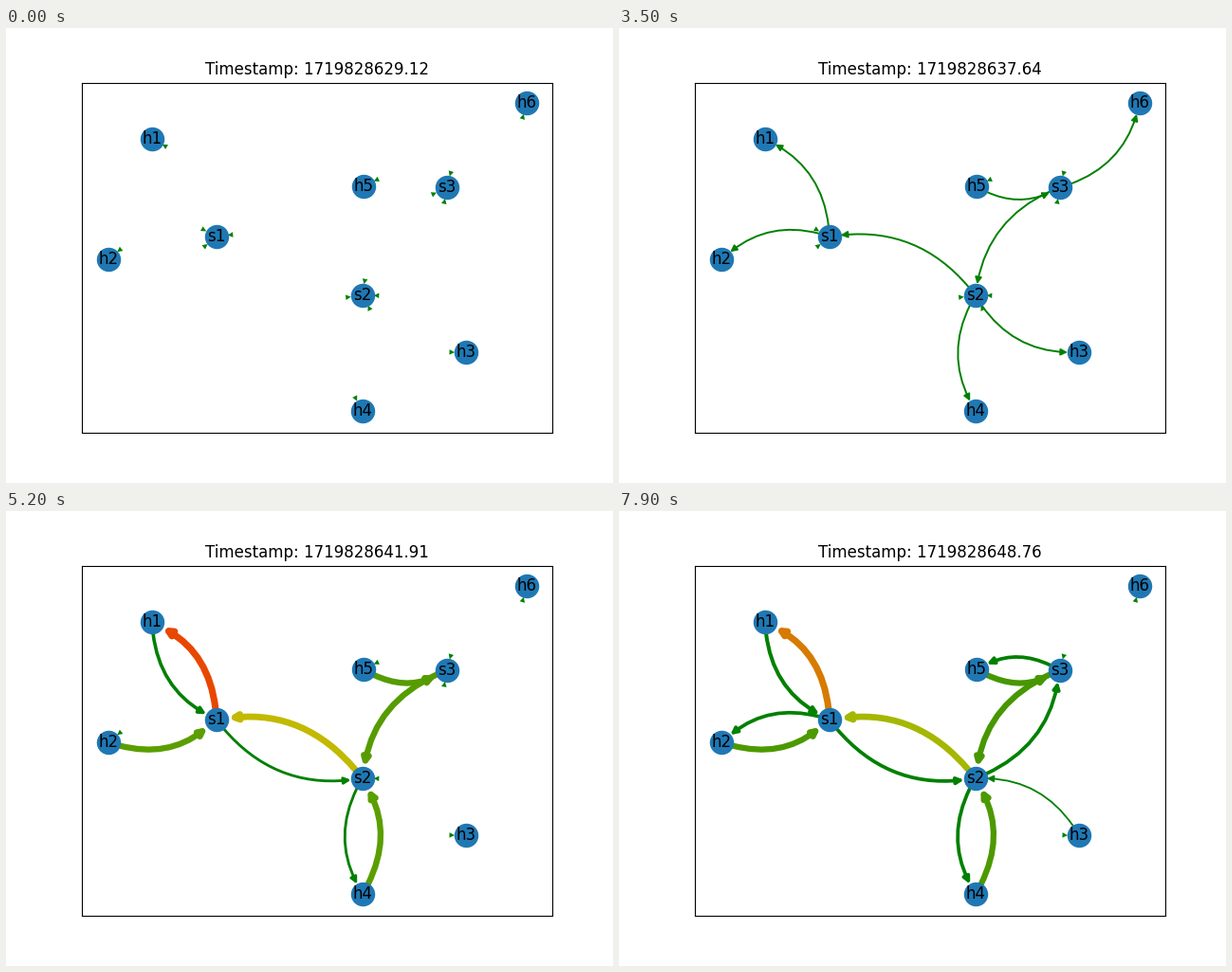
Recreate the animation shown at these times as a matplotlib script. Size 640x480 px, loop 8 s.

```python
import numpy as np
import matplotlib.pyplot as plt
from matplotlib.animation import FuncAnimation
from matplotlib.colors import LinearSegmentedColormap
from matplotlib.patches import FancyArrowPatch

plt.rcParams["font.family"] = "DejaVu Sans"

FRAMES, INTERVAL = 80, 100
NODE_SIZE = 300
FULL_RATE = 1.6e5
POLL = 4                    # steps between two traffic readings
START, QUIET = 38, 50       # hosts begin sending; replies pause once

# Node centres in stage pixels, y down.
NODES = {
    "h1": (154.1, 117.1), "h2": (108.1, 244.1), "h3": (485.1, 342.1),
    "h4": (376.0, 404.1), "h5": (377.0, 167.1), "h6": (549.0, 79.1),
    "s1": (221.8, 220.1), "s2": (375.7, 282.1), "s3": (464.7, 168.1),
}
LINKS = ["h1 s1", "h2 s1", "s1 s2", "s2 h3", "s2 h4", "s2 s3", "s3 h5", "s3 h6"]
EDGES = [e for a, b in map(str.split, LINKS) for e in ((a, b), (b, a))]

FLOOD = "h5s3 s3h6 s3s2 s2h3 s2h4 s2s1 s1h1 s1h2"
CLOCK_BASE = 1719828600
CLOCK = {0: 29.12, 20: 34.13, 35: 37.64, 42: 39.39, 52: 41.91, 68: 45.97, 79: 48.76}

heat = LinearSegmentedColormap.from_list("heat", ["g", "y", "r"])


def rates_at(i):
    """Rate of every busy edge, read once per poll."""
    step = (i - 2) // POLL * POLL + 2
    rates = {}

    def put(edges, rate):
        rates.update(dict.fromkeys(edges.split(), rate))

    if step < START:
        if step % 32 == 2:
            put(FLOOD, 25)
        return rates

    # h2, h4 and h5 send to h1; flows add up where they merge.
    load = FULL_RATE * np.interp(step, [38, 42, 50, 66, 78], [0.002, 0.11, 0.24, 0.18, 0.2])
    settled = np.clip((step - 42) / 8, 0, 1)
    put("h2s1 h4s2", load)
    put("h5s3 s3s2", load * (0.25 + 0.68 * settled))
    put("s2s1", load * (1 + 1.15 * settled))
    put("s1h1", load * (1 + 2.4 * settled))

    # Replies travel back along the same links.
    reply = np.interp(step, [QUIET, 58], [110, 500])
    put("h1s1", reply + 300)
    put("s1s2 s2h4", reply)
    if step != QUIET:
        put("s1h2 s2s3 s3h5", reply)
    if step < START + 2 * POLL:
        put("s3h6 h6s3", reply)
    if step % 16 == 14:
        put("h3s2", 20)
    return rates


fig, ax = plt.subplots(figsize=(6.4, 4.8), dpi=100)
points = np.array(list(NODES.values()))
ax.scatter(points[:, 0], points[:, 1], s=NODE_SIZE, c="#1f78b4", zorder=2)
for name, (x, y) in NODES.items():
    ax.text(x, y, name, size=12, ha="center", va="center", zorder=3)

gap = NODE_SIZE ** 0.5 / 2
arrows = {}
for a, b in EDGES:
    arrows[a + b] = ax.add_patch(FancyArrowPatch(
        NODES[a], NODES[b], arrowstyle="-|>", mutation_scale=10,
        connectionstyle="arc3,rad=0.3", shrinkA=gap, shrinkB=gap,
        color="g", lw=0, zorder=1))

ax.set(xlim=(80, 576), ylim=(427.2, 57.6), xticks=[], yticks=[])
title = ax.set_title("", fontsize=12)


def draw(i):
    rates = rates_at(i)
    for key, arrow in arrows.items():
        rate = rates.get(key, 0)
        arrow.set_linewidth(np.log10(1 + rate))
        arrow.set_color(heat(rate / FULL_RATE))
    now = CLOCK_BASE + np.interp(i, list(CLOCK), list(CLOCK.values()))
    title.set_text(f"Timestamp: {now:.2f}")
    return [title, *arrows.values()]


anim = FuncAnimation(fig, draw, frames=FRAMES, interval=INTERVAL,
                     repeat=True, repeat_delay=0, blit=False)
plt.show()
```
